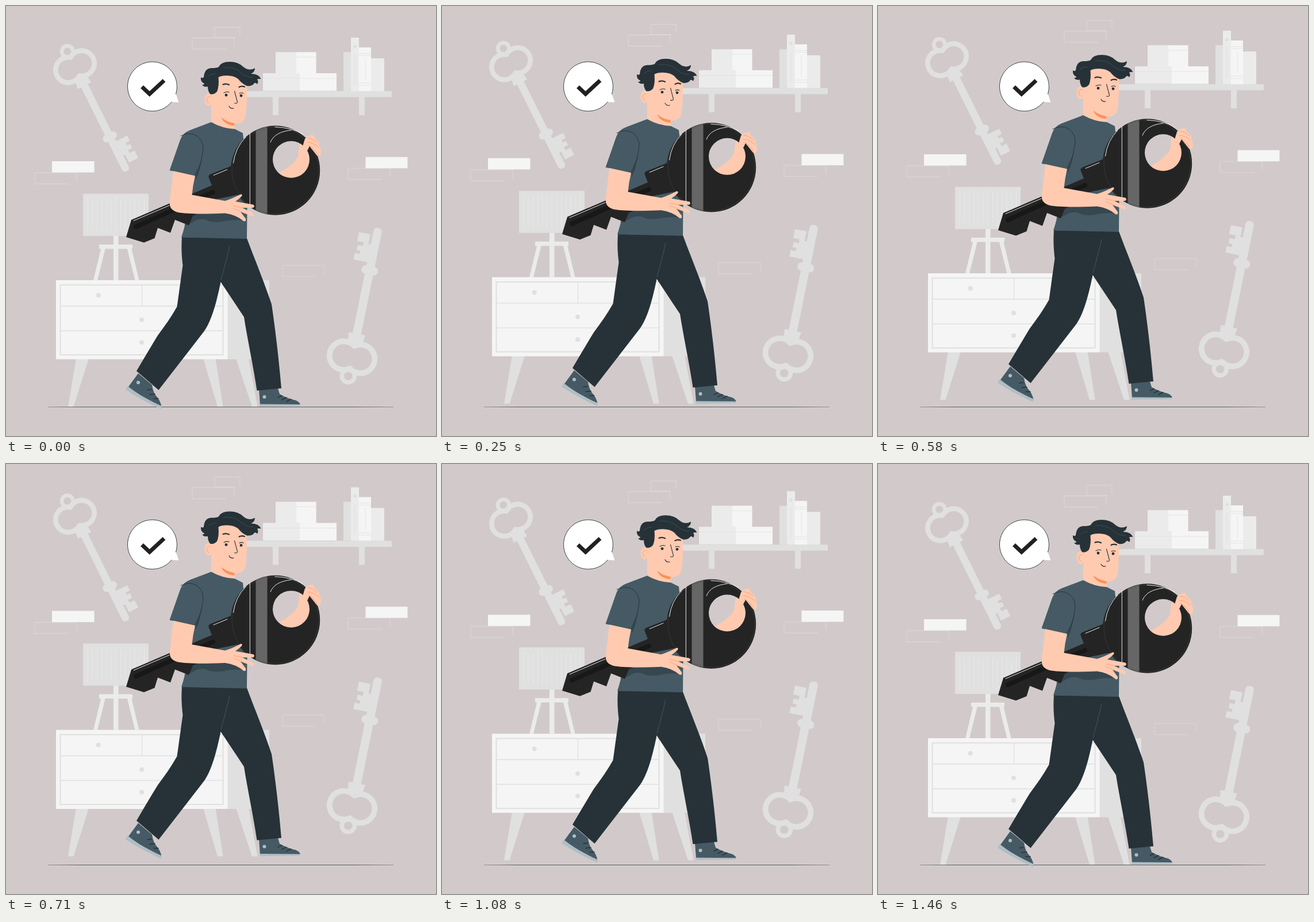
An HTML page for the animation above (1500 ms loop, 748 by 748 pixels).

```html
<!DOCTYPE html>
<html lang="en">
<head>
<meta charset="utf-8">
<title>Man with a key</title>
<style>
html, body { margin: 0; width: 100%; height: 100%; overflow: hidden; background: #d2caca; }
svg { display: block; width: 100vw; height: 100vh; }
.a { fill: #e0e0e0; } .b { fill: #ebebeb; } .c { fill: #f5f5f5; }
.ink { fill: #263238; } .cloth { fill: #455a64; } .skin { fill: #ffcab0; }
.sole { fill: #b0bec5; } .black { fill: #242424; }
.line { fill: none; stroke-linecap: round; stroke-linejoin: round; }
.grey { stroke: #e0e0e0; } .dark { stroke: #263238; } .shine { stroke: #fff; } .fold { stroke: #ff9a68; }
</style>
</head>
<body>
<svg viewBox="0 0 748 748">
  <defs>
    <g id="key">
      <g class="line grey">
        <circle cy="-29.5" r="9.8" stroke-width="6.6"/>
        <path d="M0 -17.7A22 22 0 1 0 0 17.7A22 22 0 1 0 0 -17.7Z" stroke-width="8.6"/>
      </g>
      <g class="a">
        <path d="M-11 21H11L13 37H-13ZM-6.5 36H6.5V197Q6 203 0 203Q-6 203 -6.5 197Z"/>
        <rect x="-13" y="130" width="26" height="13" rx="6.5"/>
        <path d="M5 148H28V158H20V163H26V171H18V177H28V191H10V176H5Z"/>
      </g>
    </g>
    <clipPath id="bow"><circle cx="468.5" cy="286" r="77.2"/></clipPath>
    <linearGradient id="ground">
      <stop offset="0" stop-color="#263238" stop-opacity=".35"/>
      <stop offset=".1" stop-color="#263238" stop-opacity=".7"/>
      <stop offset=".88" stop-color="#263238" stop-opacity=".7"/>
      <stop offset="1" stop-color="#263238" stop-opacity=".35"/>
    </linearGradient>
  </defs>

  <rect x="73" y="697" width="601" height="1" fill="url(#ground)"/>

  <g id="float">
    <!-- wall -->
    <g id="bricks" class="line grey" stroke-width=".7"></g>
    <path class="c" d="M80 270h73.500v19.500h-73.500zM625.500 262.700h73v19.500h-73z"/>
    <use href="#key" transform="translate(120 105.500) rotate(-26.400)"/>
    <use href="#key" transform="translate(602 611) rotate(191.500) scale(1.130)"/>

    <!-- shelf -->
    <path class="a" d="M418 148H671V158.500H624V190H614V158.500H474V190H464V158.500H418Z"/>
    <path class="b" d="M447 117h64v30.500h-64zM469 80.300h36v36.700h-36zM600 55h14v93h-14zM635 91h23v57h-23z"/>
    <path class="c" d="M511 117h64v30.500h-64zM505 80.300h34.500v36.700h-34.500zM614 72h21v76h-21z"/>
    <path class="a" d="M587 80.300h13v67.700h-13z"/>
    <circle class="a" cx="607" cy="70.500" r="3"/>
    <path class="line grey" stroke-width=".8" d="M505 89H539M511 126H575M447 126H511M605.500 84V137M608.500 84V137M614 82.500H635M614 86H635M614 134H635M614 138H635M625 91V129"/>

    <!-- lamp -->
    <path class="a" d="M134 326.700H248V400H134Z"/>
    <path id="pleats" class="line" stroke="#ebebeb" stroke-width=".8"/>
    <path class="b" d="M187 400h8.500v77h-8.500zM162 415h58v7.500h-58zM165.500 421H173L159 477H152ZM210.500 421H218L231.500 477H224.500Z"/>

    <!-- cabinet -->
    <path class="a" d="M122 613H144L117.500 697H108ZM343 613H364.500L377.500 697H368ZM400 613H422L437.500 697H428ZM385 477H458V614.500H385Z"/>
    <path class="c" d="M87 477H385.500V614.500H87Z"/>
    <rect class="line grey" x="94.500" y="485.200" width="283" height="121.500" stroke-width="2"/>
    <path class="line grey" stroke-width="1.400" d="M95 522H377M95 565H377M236.500 485V521"/>
    <g class="a"><circle cx="160.700" cy="503.300" r="4"/><circle cx="236" cy="546" r="4"/><circle cx="236" cy="585.300" r="4"/></g>

    <!-- shoes -->
    <path class="cloth" d="M230 639L254 659Q256 672 261 678Q269 687 270.500 697L211 665Z"/>
    <path class="sole" d="M211.500 661L208 667.500Q234 685 269.500 701L271 696Q236 681 211.500 661Z"/>
    <path class="cloth" d="M440 667L473 665L476 675Q490 683 504 686Q511 689 512 693.500L442 694Z"/>
    <path class="sole" d="M441.500 692.500L512 693Q512.500 695.500 510 695.800L441.500 696.800Z"/>
    <g class="sole"><circle cx="230" cy="655" r="3"/><circle cx="449.500" cy="680" r="3"/></g>
    <path class="line dark" stroke-width="1.500" d="M246 668L253 667M250 676L259 675M257 683L265 683M473 681L480 678M480 685L488 681M488 688L496 684"/>

    <!-- trousers -->
    <path class="ink" d="M306 402L419 404C430 434 450 482 462 519C466 545 474 605 479 665L436.500 669C430 625 420 580 414 541L373.500 480C368 507 359 546 344.500 566L265.500 668L227 635Q245 604 264 573C276 557 288 540 297.500 523L307.500 451C305 430 305 416 306 402Z"/>
    <path class="line" stroke="#455a64" stroke-width=".9" d="M389 418Q383 444 374 476"/>

    <!-- head -->
    <path class="skin" d="M357 146V203Q374 220 398 215V204Q415 206 417 189Q420 160 419 128L372 112Z"/>
    <ellipse class="skin" cx="352.500" cy="163" rx="7" ry="11"/>
    <path class="line fold" stroke-width=".9" d="M355 158Q349 157 349 164Q350 168 353 169"/>
    <path fill="#ff9155" d="M374.500 193.500Q382 201 397.500 204V208.500Q378 206 374.500 193.500Z"/>
    <path class="ink" d="M355 153Q351 148 351 140Q345 142 341 137Q345 137 345 135Q338 132 339 124Q342 126 344 124Q345 108 358 108Q366 108 370 106Q374 97 389 97Q404 97 413 106Q423 114 433 108Q433 115 426 118Q440 118 443.500 127Q438 126 437 128Q440 131 437 136Q435 133 432 134Q429 140 419 139Q410 135 404 127Q397 121 384 121Q374 121 369.500 124Q371 140 367 149Q361 155 355 153Z"/>
    <path class="line" stroke="#455a64" stroke-width=".7" d="M378 107Q398 105 410 117Q420 125 430 124M351 123Q357 117 364 118"/>
    <g class="ink"><circle cx="383" cy="155" r="2.400"/><circle cx="409" cy="156" r="2.400"/></g>
    <path class="line dark" stroke-width="2.200" d="M377.500 136.500Q383 134.500 388 137M405.500 141Q410 138.500 415 140.500"/>
    <path class="line dark" stroke-width="1.100" d="M379 151Q384 148 388 150M406 152Q410 150 413 152M397.500 148L402.500 167Q402.500 170 397.500 169M388 174Q390 179 396 178"/>

    <!-- shirt -->
    <path class="cloth" d="M357 202Q376 213 398 214L412 221L420 300L419 405L305 402.500Q319 360 326 295L284.500 286L303 233Q307 221 320 216Z"/>
    <path fill="#37474f" d="M342 264L331 302L328 294ZM310 382L326 360H390L414 373Q392 371 378 375Q360 378 348 372Q336 368 324 377Z"/>
    <path class="line dark" stroke-width=".9" d="M304 226Q320 218 332 226Q343 234 343 248Q341 267 333 294"/>

    <!-- big key -->
    <path class="skin" d="M466 295L474 290.500Q500 277 508 262L511 238H530L534 280L500 304Z"/>
    <path class="black" d="M352.500 298Q352 294 356 292.500L395 277L410 327L366 336L366 346L325 365L318 381.500L294 372L286 394.500L264 386L258.500 404L240 411.500L209 402L218 372L358 312Z"/>
    <path class="line" stroke="#181818" stroke-width="8" d="M226 384L360 324"/>
    <path class="line shine" stroke-width=".9" d="M222 373.500L284 347M361 294.500L385 284.500"/>
    <path class="black" fill-rule="evenodd" d="M390.800 286A77.700 77.700 0 1 1 546.200 286A77.700 77.700 0 1 1 390.800 286ZM464 267A32 32 0 1 0 528 267A32 32 0 1 0 464 267Z"/>
    <path clip-path="url(#bow)" fill="#666" d="M434.500 200H454.500V370H434.500Z"/>
    <circle class="line" cx="468.500" cy="286" r="75.500" stroke="#4a4a4a" stroke-width=".5"/>
    <path class="line shine" stroke-width=".9" d="M424.300 221V351M395.500 273Q399 246 417 228M460 237Q467 219 496 216M468 210.500Q496 211 516 223"/>

    <!-- far hand -->
    <path class="skin" d="M516 244L520 231Q524 225 533 224.500Q537 225 536 229L542 235Q546 238 545 243Q549 249 547.500 258Q544 264 540 259L528 244L524 252Z"/>
    <path class="line fold" stroke-width=".9" d="M525 230Q534 230 541 238M524 237Q534 237 544 246M526 242Q534 246 541 257"/>

    <!-- near arm -->
    <path class="skin" d="M291 287L329 295.500Q325 312 323.500 328.500L381 339Q394 335 408 327.500Q412 327 410 331Q405 336 399 340L430 345.500Q434 348 430 351L411 351L429 360Q433 364 429 366L408 358L417 370Q418 376 413 374Q400 363 381 360.500Q320 363 299 359Q283 355 285 340Z"/>
    <path class="line fold" stroke-width=".8" d="M396 348L412 351M396 352L409 358"/>
  </g>

  <!-- speech bubble -->
  <path fill="#fff" d="M295.500 153L300.500 167.500L288 167A43 43 0 1 1 295.500 153Z"/>
  <path class="line dark" stroke-width=".9" d="M288 167A43 43 0 1 1 295.500 153"/>
  <path fill="none" stroke="#212121" stroke-width="7" d="M236.500 140.500L249.700 153L275 129.500"/>
</svg>
<script>
const LOOP = 1500, STEP = 1000 / 24, LAST = 35, RISE = 15;
const $ = id => document.getElementById(id);

// thin bricks with a gap in the lower right corner
const brick = (x, y, w, h) =>
  `<path d="M${x + w * 0.8} ${y + h}H${x}V${y}H${x + w}V${y + h * 0.75}"/>`;
$("bricks").innerHTML = [
  [363, 37, 44, 18], [324, 55.5, 73, 19.5], [50, 290, 73, 19.5],
  [595, 282.3, 73, 19.5], [481, 451.3, 73, 19.5]
].map(b => brick(...b)).join("");

let pleats = "";
for (let i = 0; i < 13; i++) {
  pleats += `M${142 + i * 8.2} ${333 + i % 3 * 3}V${394 - i % 2 * 5}`;
}
$("pleats").setAttribute("d", pleats);

// straight rise and fall, held at 24 pictures a second
function draw(ms) {
  const k = Math.min(LAST, Math.floor((ms % LOOP + 5) / STEP));
  const y = -RISE * (1 - Math.abs(1 - 2 * k / LAST));
  $("float").setAttribute("transform", `translate(0 ${y.toFixed(3)})`);
}

let start;
function tick(now) {
  start ??= now;
  draw(now - start);
  requestAnimationFrame(tick);
}
draw(0);
requestAnimationFrame(tick);
</script>
</body>
</html>
```
